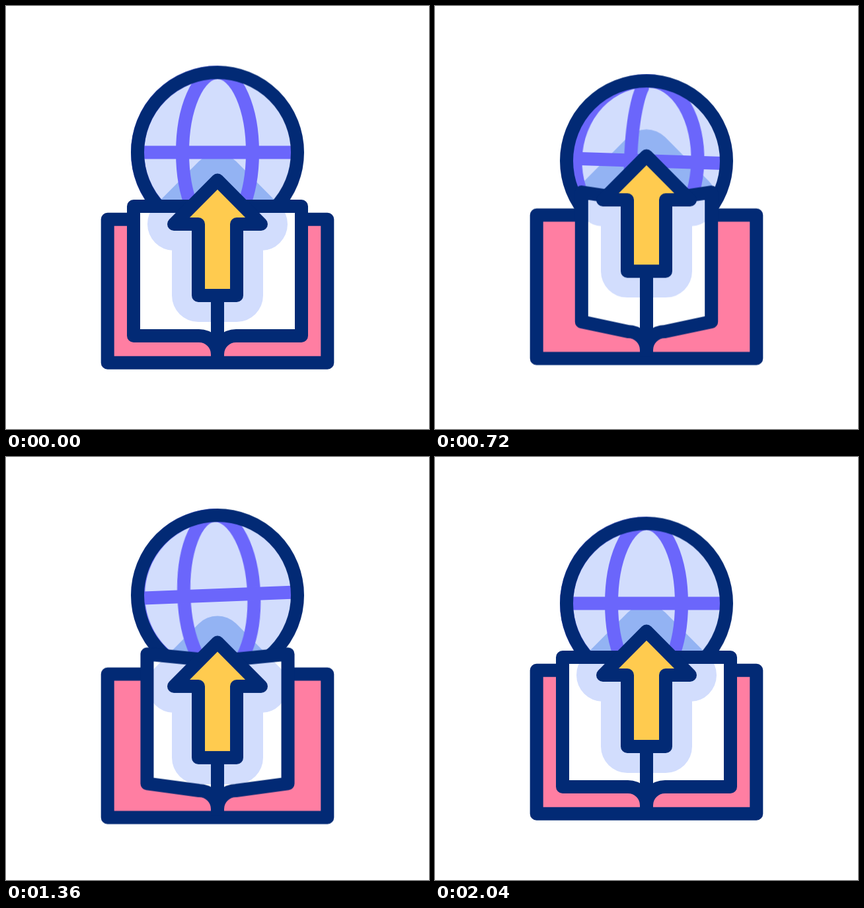
An HTML page without scripts for the animation above (2240 ms loop, 640 px wide and 640 px high).

```html
<!DOCTYPE html>
<html lang="en">
<head>
<meta charset="utf-8">
<title>Globe, book and arrow</title>
<style>
  @property --turn { syntax: "<number>"; inherits: true; initial-value: 0; }

  html, body { margin: 0; width: 100%; height: 100%; overflow: hidden; background: #fff; }

  svg {
    display: block; width: 100%; height: 100%;
    --open: path("M320 303L193 303L193 499L292 499A28 28 0 0 1 320 527A28 28 0 0 1 348 499L447 499L447 303Z");
    --folded: path("M320 303L223 287.5L223 483.5L292 499A28 28 0 0 1 320 527A28 28 0 0 1 348 499L417 483.5L417 287.5Z");
  }

  .line, .wire { stroke: #022a75; stroke-width: 20; stroke-linejoin: round; fill: none; }
  .wire { stroke: #6b66fb; }
  .shade { stroke-width: 80; stroke-linejoin: round; }

  .globe, .book, .page, .arrow, .tilt { animation: 2240ms ease-in-out infinite; }
  .globe { animation-name: globe; }
  .book { animation-name: book; }
  .page { animation-name: book, flap; d: var(--open); }
  .arrow { animation-name: arrow; }
  .tilt { animation-name: tilt, turn; }

  /* Meridians 60 degrees apart, seen from the front. */
  .west { rx: calc(106px * sin(30deg - 1deg * var(--turn))); }
  .east { rx: calc(106px * sin(30deg + 1deg * var(--turn))); }
  .limb { rx: min(121px, 121px - 0.8px * var(--turn)); }

  @keyframes globe {
    0%, 8.9%, 83%, 100% { transform: translateY(0); }
    33% { transform: translateY(12.8px); }
    55.4% { transform: translateY(-13.4px); }
  }
  @keyframes book {
    0%, 10.3%, 76.8%, 100% { transform: translateY(0); }
    33% { transform: translateY(-6.5px); }
    55.4% { transform: translateY(6.5px); }
  }
  @keyframes arrow {
    0%, 8.7%, 75.2%, 100% { transform: translateY(0); }
    29.9% { transform: translateY(-38px); }
    52% { transform: translateY(24px); }
  }
  @keyframes tilt {
    0%, 8%, 91%, 100% { transform: rotate(0deg); }
    27.7% { transform: rotate(2.1deg); }
    55.4% { transform: rotate(-2.4deg); }
  }
  @keyframes turn {
    0%, 8%, 91%, 100% { --turn: 0; }
    25.9% { --turn: 24; }
    44.6% { --turn: -6; }
    62.5% { --turn: 1.5; }
    76.8% { --turn: -3; }
  }
  /* Folds twice and springs past flat at the end. */
  @keyframes flap {
    0%, 8%, 48.4%, 91%, 100% { d: var(--open); }
    29.5% { d: var(--folded); }
    68.7% { d: var(--folded); animation-timing-function: cubic-bezier(.35, 0, .6, 1.8); }
  }
</style>
</head>
<body>
<svg viewBox="0 0 640 640">
  <defs>
    <path id="pointer" d="M320 263.5L386 330H349V438H291V330H254Z"/>
    <clipPath id="disc"><circle class="globe" cx="320" cy="221.5" r="121"/></clipPath>
    <clipPath id="sheet"><path class="page"/></clipPath>
    <clipPath id="left"><path d="M-140-140H0V140H-140Z"/></clipPath>
    <clipPath id="right"><path d="M140-140H0V140H140Z"/></clipPath>
  </defs>

  <circle class="globe" cx="320" cy="221.5" r="121" fill="#d2ddfd"/>
  <g clip-path="url(#disc)">
    <g class="arrow"><use href="#pointer" class="shade" fill="#93b3f3" stroke="#93b3f3"/></g>
  </g>
  <g class="globe">
    <g transform="translate(320 221.5)">
      <g class="tilt">
        <g clip-path="url(#left)">
          <ellipse class="wire limb" ry="121"/>
          <ellipse class="wire west" ry="121"/>
        </g>
        <g clip-path="url(#right)"><ellipse class="wire east" ry="121"/></g>
        <path class="wire" d="M-121 0H121"/>
      </g>
      <circle class="line" r="121"/>
    </g>
  </g>

  <rect class="line book" x="153.7" y="322.7" width="332.6" height="217" style="fill:#ff7ea2"/>
  <path class="page" fill="#fff"/>
  <g clip-path="url(#sheet)">
    <g class="arrow"><use href="#pointer" class="shade" fill="#d2ddfd" stroke="#d2ddfd"/></g>
  </g>
  <path class="line page"/>
  <path class="line book" d="M320 303V537"/>

  <g class="arrow"><use href="#pointer" class="line" style="fill:#ffcb4f"/></g>
</svg>
</body>
</html>
```
